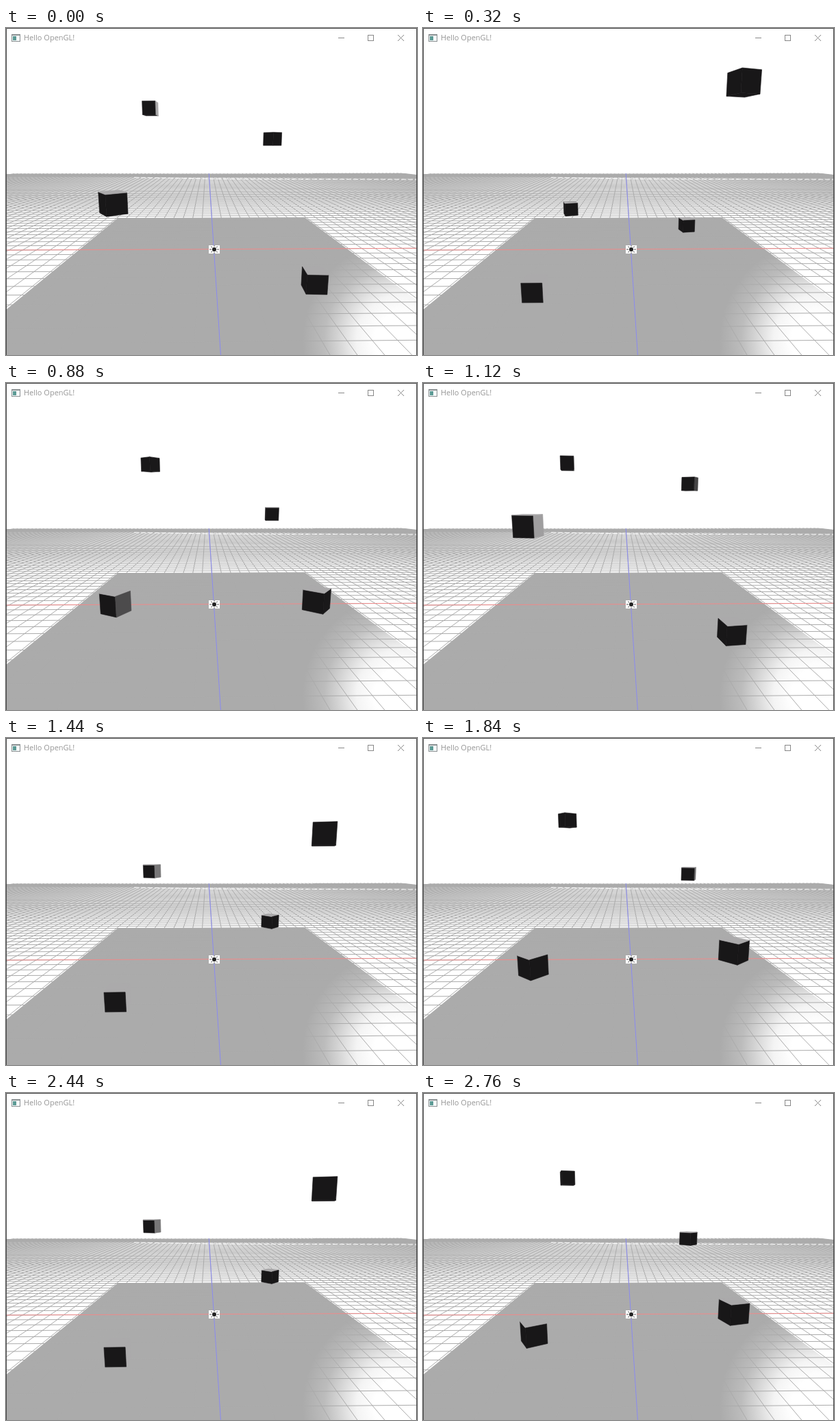
Recreate the animation shown at these times as an HTML page with a canvas. Size 600 px wide and 477 px high, loop 2.8 s.

```html
<!DOCTYPE html>
<html>
<head>
<meta charset="utf-8">
<style>
html, body { margin: 0; width: 100%; height: 100%; overflow: hidden; background: #fff; }
canvas { display: block; }
</style>
</head>
<body>
<canvas id="stage" width="600" height="477"></canvas>
<script>
const ctx = document.getElementById('stage').getContext('2d');
const FOCAL = 455, PITCH = 0.178, YAW = 0.014;
const CAMERA = [-0.24, 3.78, 11];
const GREY = '#ababab';
const LIGHT = [0.6, 0.5, -0.75];

function project([px, py, pz]) {
  const x = px - CAMERA[0], y = py - CAMERA[1], z = pz - CAMERA[2];
  const side = x * Math.cos(YAW) + z * Math.sin(YAW);
  const ahead = x * Math.sin(YAW) - z * Math.cos(YAW);
  const depth = ahead * Math.cos(PITCH) - y * Math.sin(PITCH);
  const up = y * Math.cos(PITCH) + ahead * Math.sin(PITCH);
  return [300 + FOCAL * side / depth, 252.5 - FOCAL * up / depth];
}

function trace(c, points) {
  c.beginPath();
  points.forEach(p => c.lineTo(...p));
}

function line(c, color, ...points) {
  c.strokeStyle = color;
  trace(c, points);
  c.stroke();
}

function fill(c, color, points) {
  c.fillStyle = color;
  trace(c, points);
  c.fill();
}

function drawGround(c) {
  const spot = c.createRadialGradient(578, 455, 40, 578, 455, 145);
  spot.addColorStop(0, '#fff');
  spot.addColorStop(0.25, '#f4f4f4');
  spot.addColorStop(0.7, '#bcbcbc');
  spot.addColorStop(1, GREY);
  const floor = [[-4.94, 0, -5], [4.94, 0, -5], [4.94, 0, 8], [-4.94, 0, 8]];
  fill(c, spot, floor.map(project));

  const ground = (color, a, b) => line(c, color, project([a[0], 0, a[1]]), project([b[0], 0, b[1]]));
  const step = 0.5;
  for (let x = -26; x <= 26; x += step) ground(GREY, [x, -31], [x, 9]);
  for (let z = -31; z <= 9; z += step) {
    // Thin the rows where they crowd together near the horizon.
    const gap = step * FOCAL * CAMERA[1] / (CAMERA[2] - z) ** 2;
    c.lineWidth = Math.min(1, gap * 0.6);
    ground(GREY, [-26, z], [26, z]);
  }
  c.lineWidth = 1;
  fill(c, GREY, [[0, 213], [450, 213], [450, 212], [582, 212], [600, 214], [600, 219], [300, 218], [0, 217]]);
  c.setLineDash([7, 3]);
  line(c, '#fff', [187, 218], [300, 220], [600, 221]);
  c.setLineDash([]);
  ground('#f08a8a', [-26, 0], [26, 0]);
  ground('#8a8af0', [0, -31], [0, 9]);
}

function drawLamp(c) {
  c.fillStyle = '#fff';
  c.fillRect(296, 317, 16, 12);
  for (let i = 0; i < 8; i++) {
    const a = i * Math.PI / 4, dx = Math.cos(a), dy = Math.sin(a);
    line(c, '#555', [304 + dx * 4, 323 + dy * 4], [304 + dx * 7, 323 + dy * 6]);
  }
  c.fillStyle = '#222';
  c.beginPath();
  c.arc(304, 323, 3, 0, 7);
  c.fill();
}

function drawWindow(c) {
  c.fillStyle = '#fff';
  c.fillRect(0, 0, 600, 28);
  c.fillStyle = '#8a9092';
  c.fillRect(8, 9, 13, 11);
  c.fillStyle = '#f4f8f8';
  c.fillRect(9, 11, 11, 8);
  c.fillStyle = '#5b9a94';
  c.fillRect(10, 12, 5, 6);
  c.fillStyle = '#969696';
  c.font = '11px "Open Sans", sans-serif';
  c.fillText('Hello OpenGL!', 26, 18);
  line(c, '#888', [485, 14.5], [494, 14.5]);
  c.strokeRect(528.5, 10.5, 8, 8);
  line(c, '#888', [572, 10], [581, 19]);
  line(c, '#888', [581, 10], [572, 19]);
  line(c, '#444', [0.5, 477], [0.5, 0.5], [599.5, 0.5], [599.5, 477]);
}

const scene = document.createElement('canvas');
scene.width = 600;
scene.height = 477;
const sceneCtx = scene.getContext('2d');
sceneCtx.fillStyle = '#fff';
sceneCtx.fillRect(0, 0, 600, 477);
drawGround(sceneCtx);
drawLamp(sceneCtx);
drawWindow(sceneCtx);

const linear = t => t;
const cubicIn = t => t ** 3;
const quintOut = t => 1 - (1 - t) ** 5;
const sineOut = t => Math.sin(t * Math.PI / 2);
function bounceOut(t) {
  const n = 7.5625, d = 2.75;
  if (t < 1 / d) return n * t * t;
  if (t < 2 / d) return n * (t - 1.5 / d) ** 2 + 0.75;
  if (t < 2.5 / d) return n * (t - 2.25 / d) ** 2 + 0.9375;
  return n * (t - 2.625 / d) ** 2 + 0.984375;
}

const cubes = [
  { x: -2.38, z: -1.25, rise: quintOut, spin: sineOut },
  { x: 2.29, z: -1.25, rise: linear, spin: linear },
  { x: -2.38, z: 4, rise: cubicIn, spin: cubicIn },
  { x: 2.33, z: 4, rise: t => 1 - bounceOut(t), spin: sineOut }
];

// Each face: normal, then its two edge directions.
const FACES = [];
for (const s of [-1, 1]) {
  FACES.push([[s, 0, 0], [0, 1, 0], [0, 0, 1]]);
  FACES.push([[0, s, 0], [1, 0, 0], [0, 0, 1]]);
  FACES.push([[0, 0, s], [1, 0, 0], [0, 1, 0]]);
}
const CORNERS = [[-1, -1], [1, -1], [1, 1], [-1, 1]];
const HALF = 0.243;
const dot = (a, b) => a.reduce((sum, v, i) => sum + v * b[i], 0);

function drawCube(cube, t) {
  const center = [cube.x, 0.41 + 4.73 * cube.rise(t), cube.z];
  const angle = 5 * cube.spin(t), sin = Math.sin(angle), cos = Math.cos(angle);
  const turn = ([x, y, z]) => [x * cos + z * sin, y, z * cos - x * sin];
  for (const face of FACES) {
    const [n, u, v] = face.map(turn);
    const toCamera = CAMERA.map((c, i) => c - center[i] - n[i] * HALF);
    if (dot(n, toCamera) <= 0) continue;
    const shade = Math.round(Math.min(171, 24 + 294 * Math.max(0, dot(n, LIGHT))));
    const color = `rgb(${shade},${shade - 1},${shade})`;
    const points = CORNERS.map(([a, b]) =>
      project(center.map((c, i) => c + HALF * (n[i] + a * u[i] + b * v[i]))));
    fill(ctx, color, points);
    // A hairline closes the seam between faces.
    ctx.lineWidth = 0.6;
    line(ctx, color, ...points, points[0]);
  }
}

function draw(now) {
  const ms = Math.max(40, Math.floor(now % 2800 / 40) * 40);
  const t = (ms + 720) % 1000 / 1000;
  ctx.drawImage(scene, 0, 0);
  cubes.forEach(cube => drawCube(cube, t));
}

const start = performance.now();
function tick() {
  draw(performance.now() - start);
  requestAnimationFrame(tick);
}
tick();
</script>
</body>
</html>
```
